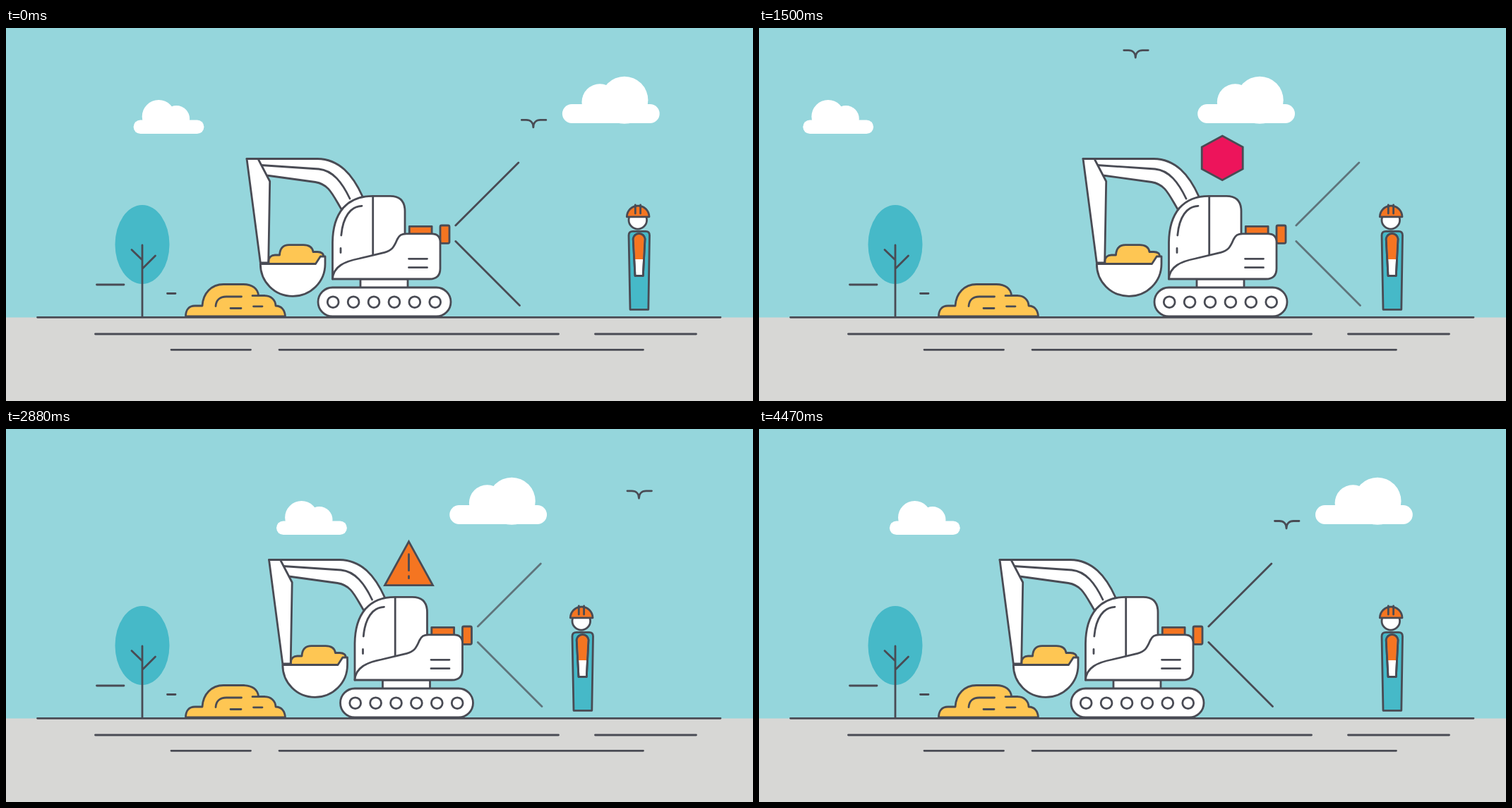
Animation, 1058 px wide and 529 px high, one loop 4500 ms. Source, as an HTML page:

```html
<!DOCTYPE html>
<html lang="en">
<head>
<meta charset="utf-8">
<title>Excavator safety zone</title>
<style>
  html, body { margin: 0; width: 100%; height: 100%; overflow: hidden; background: #95d6dc; }
  svg { display: block; width: 100%; height: 100%; }
  .ink { stroke: #494b54; stroke-width: 2.8; stroke-linecap: round; stroke-linejoin: round; }
  .line { fill: none; }
  .white { fill: #fff; }
  .teal { fill: #46b9c8; }
  .orange { fill: #f57521; }
  .yellow { fill: #fec653; }
  .pink { fill: #ed145b; }
  .sharp { stroke-linejoin: miter; }
</style>
</head>
<body>
<svg viewBox="0 0 1058 529" preserveAspectRatio="none">
  <rect width="1058" height="529" fill="#95d6dc"/>
  <rect y="410.5" width="1058" height="119" fill="#d7d7d5"/>

  <g id="smallCloud" class="white">
    <rect x="180.7" y="130.5" width="99.8" height="19.5" rx="9.75"/>
    <circle cx="216.3" cy="125.5" r="23.5"/>
    <circle cx="241.5" cy="128.7" r="18.7"/>
  </g>
  <g id="bigCloud" class="white">
    <rect x="788" y="108" width="137.8" height="27" rx="13.5"/>
    <circle cx="876" cy="102.3" r="33.5"/>
    <circle cx="841.3" cy="105" r="25.7"/>
  </g>

  <g class="ink line">
    <ellipse cx="193" cy="307" rx="38.5" ry="56" class="teal" stroke="none"/>
    <path d="M193 308V409M178 314.500L193 329M193 341.500L211.500 323"/>
    <path d="M128.500 364H167M228.500 376.500H240"/>
    <path d="M44.500 410.300H1012M126.500 434H782.500M834.500 434H977.500M234 456.300H346.500M387 456.300H902.500"/>
  </g>

  <g class="ink">
    <path class="yellow" d="M254.500 409C254.500 400 259 394 267.500 394H278C279 376 291 363.500 308 363.500H336C349 363.500 357 370 357.500 379.700H366C375 379.700 381.500 385 382 394C390 394 395 400 395.500 409Z"/>
    <path class="line" d="M297 394.500C297.500 386 303 381 312 381H333.500M318 397.500H333M349 379.700H366M350.500 394.800H363"/>
  </g>

  <g id="worker" class="ink">
    <path class="teal" d="M884 399.300L882 294Q882 288.300 888 288.300H906Q911.500 288.300 911.500 294L909.800 399.300Z"/>
    <path class="white" d="M891 351.500L888.200 299A8.500 8.800 0 0 1 905 299L902.300 351.500Z"/>
    <path class="orange" stroke="none" d="M891 328L889.500 299A7.100 7.500 0 0 1 903.700 299L902.300 328Z"/>
    <path class="line" d="M891 351.500L888.200 299A8.500 8.800 0 0 1 905 299L902.300 351.500Z"/>
    <circle class="white" cx="894.8" cy="272.300" r="12.800"/>
    <path class="orange" d="M879.300 267.800A15.700 15.600 0 0 1 911 267.800Z"/>
    <path class="line" d="M891.300 251V263M898.600 251V263"/>
  </g>

  <path id="beams" class="ink line" d="M636.800 280L725.800 191M636.800 302.500L727.500 393.500"/>

  <g id="digger" class="ink white">
    <path d="M341 185.500H441C472 186 491 208 505 239L475 257C462 235 457 221.500 438 218.500L369 209Z"/>
    <path class="line" d="M361 194.500L443 200C463 202 476 219 487 242"/>
    <path d="M341 185.500H357L373.700 217.500L371.700 332.800H360.300Z"/>
    <path class="yellow" d="M372 335V331C372 325 376 322 381 322H387.500C388 312 393 307.700 401 307.700H421C429 307.700 434 311 435 317.500H441C447 317.500 450 320.500 449.500 324L440 335Z"/>
    <path d="M360.300 334.500H438.500L445.300 324H452V334.500C452 360 431.500 380.300 406 380.300S360.300 360 360.300 334.500Z"/>
    <rect class="orange" x="571.300" y="281.300" width="31.800" height="12"/>
    <rect class="orange" x="615" y="280" width="13" height="25.300" rx="2"/>
    <path d="M462.500 356V304C463 263 482 238.300 519.500 238.300H544Q565 238.300 565 260V300L540 330Z"/>
    <path class="line" d="M519.700 238.300V321M474.800 294C477 268 488 252.800 504 252.300M474 312.500V318.500"/>
    <rect x="502" y="356" width="67" height="13"/>
    <path d="M462.500 356H600Q615 356 615 341V304Q615 291.800 603 291.800H567C560 291.800 557 294 554 300C549 312 546 315.500 536 318.300L500 327C480 331 463.500 338 462.500 356Z"/>
    <path class="line" d="M570.500 327.300H596.500M570.500 339.700H596.500"/>
    <rect x="442" y="368" width="188" height="41" rx="20.500"/>
    <g id="wheels"></g>
  </g>

  <g id="warning" class="ink">
    <path class="orange sharp" d="M0-30.500L34 31.500H-34Z"/>
    <path class="line" d="M0-12.500V10.500M0 18.500V21.500"/>
  </g>
  <path id="stop" class="ink pink sharp" d="M0-31.300L29-15.600V15.600L0 31.300L-29 15.600V-15.600Z"/>

  <path id="bird" class="ink line" d="M730.500 130.500H737C743 130.500 747 134.500 747 141C747 134.500 751 130.500 757 130.500H765"/>
</svg>
<script>
const LOOP = 4500;
const BLINK = 324;
const el = id => document.getElementById(id);
const clamp = v => Math.max(0, Math.min(1, v));
const linear = u => u;
const smooth = u => u * u * (3 - 2 * u);

// Keys are [time, value] pairs; the last value holds.
function track(keys, t, ease = smooth) {
  for (let i = 1; i < keys.length; i++) {
    const [t0, a] = keys[i - 1], [t1, b] = keys[i];
    if (t < t1) return a + (b - a) * ease(clamp((t - t0) / (t1 - t0)));
  }
  return keys[keys.length - 1][1];
}

const secondTrip = [[2040, 0], [2180, 0], [2790, 31.5], [3240, 31.5], [4200, 0]];
const diggerKeys = [[0, 0], [1220, 118], [1525, 118], ...secondTrip];
const beamKeys = [[0, 0], [1155, 124], [1525, 124], ...secondTrip];
const workerKeys = [[0, 0], [2180, 0], [2790, -80], [3240, -80], [4200, 0]];
const smallCloudKeys = [[0, 0], [1530, -120.7], [2970, 223.6], [4500, 0]];
const bigCloudKeys = [[0, 0], [2130, -236.7], [4440, 0]];
const birdX = [[0, 0], [1500, -214], [2940, 165], [4470, 0]];
const birdY = [[0, 0], [1500, -99], [2940, -40.3], [4470, 0]];

// Each sign: from, to, horizontal offset.
const warnings = [[420, 1110, 2], [2760, 3090, 0]];
const stops = [[1110, 1800, -0.5], [3090, 3570, 0]];
const blinks = [[1118, 3], [2822, 4]];

el('wheels').innerHTML = Array.from({ length: 6 }, (_, i) =>
  `<circle cx="${463.2 + i * 28.9}" cy="388.700" r="7.900"/>`).join('');

function move(id, x, y = 0) {
  el(id).setAttribute('transform', `translate(${x.toFixed(2)} ${y.toFixed(2)})`);
}

function showSign(id, spans, t, x, y, rise) {
  const span = spans.find(([from, to]) => t >= from && t < to);
  el(id).setAttribute('opacity', span ? clamp((t - span[0]) / 100) * clamp((span[1] - t) / 60) : 0);
  if (span) move(id, x + span[2], y + rise * (1 - smooth(clamp((t - span[0]) / 300))));
}

function beamOpacity(t) {
  const hit = blinks.find(([from, n]) => t >= from && t < from + n * BLINK);
  return hit ? 0.5 + 0.5 * Math.cos((t - hit[0]) / BLINK * 2 * Math.PI) : 1;
}

function draw(t) {
  const x = track(diggerKeys, t);
  move('digger', x);
  move('beams', track(beamKeys, t));
  el('beams').setAttribute('opacity', beamOpacity(t));
  move('worker', track(workerKeys, t));
  move('smallCloud', track(smallCloudKeys, t, linear));
  move('bigCloud', track(bigCloudKeys, t, linear));
  move('bird', track(birdX, t, linear), track(birdY, t, linear));
  showSign('warning', warnings, t, 539 + x, 185, 8);
  showSign('stop', stops, t, 538.7 + x, 184.4, 0);
}

const start = performance.now();
function frame(now) {
  draw(Math.max(0, now - start) % LOOP);
  requestAnimationFrame(frame);
}
draw(0);
requestAnimationFrame(frame);
</script>
</body>
</html>
```
